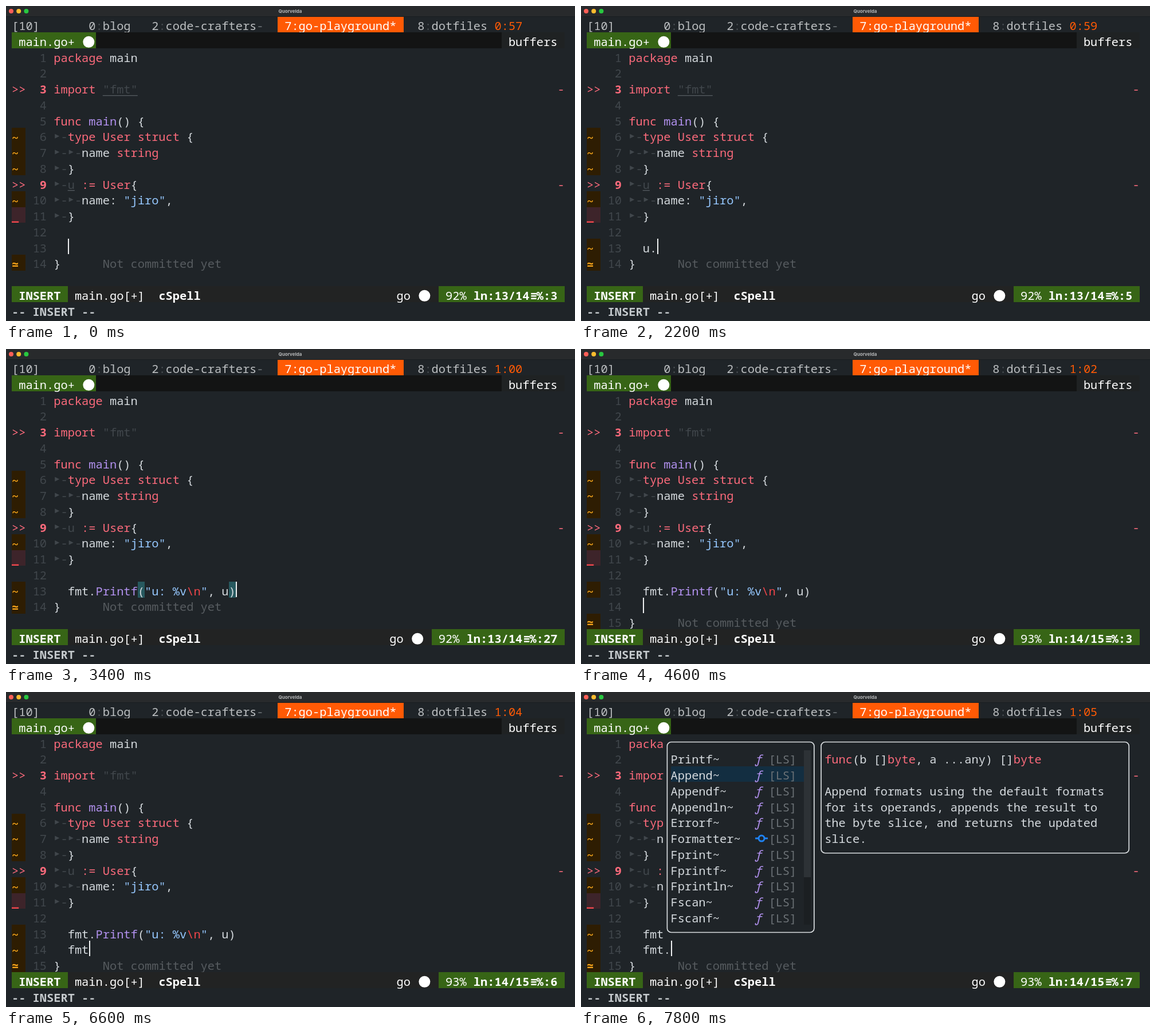
Write an HTML page with a canvas that moves like this. It is 993 px wide and 551 px high and loops after 8 s.

```html
<!DOCTYPE html>
<html lang="en">
<head>
<meta charset="utf-8">
<title>Terminal editor</title>
<style>
html, body { margin: 0; width: 100%; height: 100%; overflow: hidden; background: #1f2428; }
canvas { display: block; width: 993px; height: 551px; }
</style>
</head>
<body>
<canvas id="screen"></canvas>
<script>
const W = 993, H = 551, LOOP = 8000, STEP = 200;
const CW = 12.21, RH = 27.75, LEFT = 10, TOP = 18.6;
const FONT = '20.35px "Noto Sans Mono", "DejaVu Sans Mono", monospace';
const C = {
  bg: '#1f2428', fg: '#d5dade', red: '#fb6a7b', purple: '#b392f0', blue: '#96c8ff',
  dim: '#41474c', faint: '#4a4f53', note: '#575c60', white: '#ffffff', green: '#376516',
  orange: '#ff5a05', amber: '#f8a51b', signBg: '#2e1d02', cyan: '#2ba0bd', tag: '#6c7276',
  tab: '#bcbfc1', bar: '#222323', select: '#132e41', thumb: '#2d3236', track: '#1b1f22'
};

const canvas = document.getElementById('screen');
const ctx = canvas.getContext('2d');
const dpr = window.devicePixelRatio || 1;
canvas.width = W * dpr;
canvas.height = H * dpr;

const X = col => LEFT + col * CW;
const Y = row => TOP + row * RH;

function box(col, row, cols, rows, color) {
  const x = Math.round(X(col)), y = Math.round(Y(row));
  ctx.fillStyle = color;
  ctx.fillRect(x, y, Math.round(X(col + cols)) - x, Math.round(Y(row + rows)) - y);
}

function text(col, row, str, color = C.fg, style = '') {
  ctx.font = style + ' ' + FONT;
  ctx.fillStyle = color;
  ctx.fillText(str, X(col), Y(row) + 23.4);
}

// Draws [string, color] runs one after another.
function runs(col, row, ...parts) {
  for (const [str, color, style] of parts) {
    text(col, row, str, color, style);
    col += str.length;
  }
}

function dot(x, y, r, color) {
  ctx.fillStyle = color;
  ctx.beginPath();
  ctx.arc(x, y, r, 0, Math.PI * 2);
  ctx.fill();
}

function underline(col, row, cols) {
  ctx.fillStyle = '#555b60';
  ctx.fillRect(X(col), Math.round(Y(row) + 26), cols * CW, 1.3);
}

function tabMark(col, row) {
  const x = X(col) + 2, y = Y(row) + 14.8;
  ctx.fillStyle = C.dim;
  ctx.beginPath();
  ctx.moveTo(x, y - 4);
  ctx.lineTo(x + 8, y);
  ctx.lineTo(x, y + 4);
  ctx.fill();
  text(col + 1, row, '-', C.dim);
}

function sign(row, mark) {
  box(0, row, 2, 1, C.signBg);
  text(0, row + .05, mark, C.amber, 'bold');
}

function frameBox(col, row, cols, rows) {
  box(col, row, cols, rows, C.bg);
  ctx.strokeStyle = '#d9dde0';
  ctx.lineWidth = 1.7;
  ctx.beginPath();
  ctx.roundRect(X(col + .5), Y(row + .5) - .5, (cols - 1) * CW, (rows - 1) * RH, 7);
  ctx.stroke();
}

function moduleIcon(col, row) {
  const x = X(col) + 3.5, y = Y(row) + 7.5;
  ctx.strokeStyle = C.red;
  ctx.lineWidth = 1.8;
  ctx.beginPath();
  ctx.moveTo(x, y);
  ctx.lineTo(x + 12, y);
  ctx.lineTo(x + 17, y + 5);
  ctx.lineTo(x + 17, y + 19);
  ctx.lineTo(x, y + 19);
  ctx.closePath();
  for (const s of [-1, 1]) {
    ctx.moveTo(x + 8.5 + s * 2, y + 8);
    ctx.lineTo(x + 8.5 + s * 5, y + 11.5);
    ctx.lineTo(x + 8.5 + s * 2, y + 15);
  }
  ctx.stroke();
}

function interfaceIcon(col, row) {
  const x = X(col), y = Y(row) + 15.5;
  ctx.strokeStyle = '#1f83f5';
  ctx.lineWidth = 3;
  ctx.beginPath();
  ctx.moveTo(x + 1, y);
  ctx.lineTo(x + 6, y);
  ctx.moveTo(x + 18, y);
  ctx.lineTo(x + 23, y);
  ctx.moveTo(x + 17, y);
  ctx.arc(x + 12, y, 5, 0, Math.PI * 2);
  ctx.stroke();
}

const icons = {
  m: moduleIcon,
  i: interfaceIcon,
  f: (col, row) => text(col, row, 'ƒ', C.purple, 'italic')
};

// Each item is "label kind tag"; letters of the query are lit in order.
function menu(col, cols, kindCol, items, query, selected, thumbRows) {
  frameBox(col, 2, cols, 13);
  const end = col + cols - 2;
  box(col + 1, 3 + selected, cols - 3, 1, C.select);
  box(end, 3, 1, 11, C.track);
  box(end, 3, 1, thumbRows, C.thumb);
  items.forEach((item, i) => {
    const [label, kind, tag] = item.split(' ');
    const row = 3 + i;
    let hit = 0;
    runs(col + 1, row, ...[...label].map(ch => {
      const lit = hit < query.length && ch === query[hit];
      if (lit) hit++;
      return [ch, lit ? C.cyan : C.fg];
    }));
    if (icons[kind]) icons[kind](kindCol, row);
    text(kindCol + 2, row, tag, C.tag);
  });
}

const wordItems = ['fmt~ m [LS]', 'fmtcmd~ m [LS]', 'fmtsort~ m [LS]', 'fmtsort~ m [LS]',
  'fmt.Append~ f [LS]', 'fmt.Appendf~ f [LS]', 'fmt.Appendln~ f [LS]',
  'format - [10K]', 'formats - [10K]', 'formation - [10K]', 'formatting - [10K]'];
const memberItems = ['Printf', 'Append', 'Appendf', 'Appendln', 'Errorf', 'Formatter',
  'Fprint', 'Fprintf', 'Fprintln', 'Fscan', 'Fscanf']
  .map(name => `${name}~ ${name === 'Formatter' ? 'i' : 'f'} [LS]`);

function wordMenu() {
  menu(7, 25, 22, wordItems, 'fmt', 0, 9);
  frameBox(32, 2, 7, 3);
  text(33, 3, '"fmt"', C.blue);
}

function memberMenu(selected) {
  menu(11, 22, 24, memberItems, '', selected, 8);
  if (selected !== 1) return;
  frameBox(33, 2, 45, 8);
  runs(34, 3, ['func', C.red], ['(b []'], ['byte', C.red], [', a ...any) []'], ['byte', C.red]);
  ['Append formats using the default formats', 'for its operands, appends the result to',
    'the byte slice, and returns the updated', 'slice.']
    .forEach((line, i) => text(34, 5 + i, line));
}

const CALL = 'fmt.Printf("u: %v\\n", u)';
const typing = [
  [0, ''], [1400, 'u'], [1800, 'u.'], [2800, CALL], [4200, CALL, ''],
  [5000, CALL, 'f'], [5200, CALL, 'fm'], [5400, CALL, 'fmt'], [7000, CALL, 'fmt.']
];

function typedAt(t) {
  const [, first, second] = typing.filter(k => k[0] <= t).pop();
  return { first, second, split: second !== undefined };
}

function titleBar() {
  ctx.fillStyle = '#282a2c';
  ctx.fillRect(0, 0, W, 18);
  ctx.fillStyle = '#191d20';
  ctx.fillRect(0, 18, W, 1);
  ['#ff5f57', '#febc2e', '#28c840'].forEach((c, i) => dot(9 + i * 13.2, 9, 4, c));
  ctx.font = 'bold 8px Inter, sans-serif';
  ctx.fillStyle = '#b5b7b8';
  ctx.textAlign = 'center';
  ctx.fillText('Quorvelda', 496, 12);
  ctx.textAlign = 'left';
}

function tabs(t) {
  text(0, 0, '[10]', C.tab);
  runs(11, 0, ['0', C.tab], [':', C.faint], ['blog', C.tab]);
  runs(20, 0, ['2', C.tab], [':', C.faint], ['code-crafters', C.tab], ['-', C.tag]);
  box(38, 0, 18, 1, C.orange);
  text(39, 0, '7:go-playground*', C.white);
  runs(58, 0, ['8', C.tab], [':', C.faint], ['dotfiles', C.tab]);
  const sec = 57 + Math.floor((t + 400) / 1000);
  text(69, 0, Math.floor(sec / 60) + ':' + String(sec % 60).padStart(2, '0'), C.orange);

  box(0, 1, 12, 1, C.green);
  box(12, 1, 58, 1, '#131414');
  box(70, 1, 9, 1, '#1f2223');
  text(1, 1, 'main.go+', C.white);
  dot(X(11), Y(1) + 16.5, 10, C.white);
  text(71, 1, 'buffers', C.white);
}

function gutter(state) {
  const count = state.split ? 15 : 14;
  for (let n = 1; n <= count; n++) {
    const row = n + 1, error = n === 3 || n === 9;
    text(n < 10 ? 4 : 3, row, String(n), error ? C.red : C.dim, error ? 'bold' : '');
    if (error) {
      text(0, row, '>>', C.red);
      text(78, row, '-', C.red);
    }
  }
  [6, 7, 8, 10].forEach(n => sign(n + 1, '~'));
  box(0, 12, 2, 1, '#3d242a');
  text(0, 12, '_', '#f3484e', 'bold');
  if (state.first) sign(14, '~');
  if (state.second) sign(15, '~');
  sign(count + 1, '≃');
}

function code(state) {
  const unused = state.first !== CALL;
  runs(6, 2, ['package', C.red], [' main']);
  runs(6, 4, ['import ', C.red], ['"fmt"', C.dim]);
  runs(6, 6, ['func ', C.red], ['main', C.purple], ['() {']);
  [7, 8, 9, 10, 11, 12].forEach(row => tabMark(6, row));
  [8, 11].forEach(row => tabMark(8, row));
  runs(8, 7, ['type User struct', C.red], [' {']);
  runs(10, 8, ['name '], ['string', C.red]);
  text(8, 9, '}');
  runs(8, 10, ['u ', C.dim], [':= User', C.red], ['{']);
  runs(10, 11, ['name: '], ['"jiro"', C.blue], [',']);
  text(8, 12, '}');
  if (unused) {
    underline(13, 4, 5);
    underline(8, 10, 1);
    text(8, 14, state.first);
  } else {
    if (!state.split) [18, 31].forEach(col => box(col, 14, 1, 1, '#27595f'));
    runs(8, 14, ['fmt.'], ['Printf', C.purple], ['('], ['"u: %v', C.blue],
      ['\\n', '#f04549'], ['"', C.blue], [', u)']);
  }
  if (state.split) text(8, 15, state.second);
  const last = state.split ? 16 : 15;
  text(6, last, '}');
  text(13, last, 'Not committed yet', C.note);
}

function cursor(state) {
  const line = state.split ? state.second : state.first;
  ctx.fillStyle = '#eef0f1';
  ctx.fillRect(Math.ceil(X(8 + line.length)), Math.round(Y(state.split ? 15 : 14)), 2, 27);
}

function statusLine(state) {
  const line = state.split ? state.second : state.first;
  const pos = ':' + (line.length + 3);
  const start = 63 - pos.length;
  box(8, 17, 71, 1, C.bar);
  box(0, 17, 8, 1, C.green);
  box(start, 17, 79 - start, 1, C.green);
  text(1, 17, 'INSERT', C.white, 'bold');
  text(9, 17, 'main.go[+]', C.white);
  text(21, 17, 'cSpell', C.white, 'bold');
  text(start - 6, 17, 'go', C.white);
  dot(X(start - 2), Y(17) + 16.5, 10, C.white);
  text(start + 1, 17, state.split ? '93%' : '92%', C.white);
  text(start + 5, 17, state.split ? 'ln:14/15' : 'ln:13/14', C.white, 'bold');
  text(start + 13.1, 17, '≡', C.white, 'bold');
  text(start + 14, 17, '%' + pos, C.white, 'bold');
  text(0, 18, '-- INSERT --', '#c5cacd', 'bold');
}

function draw(t) {
  const state = typedAt(t);
  ctx.setTransform(dpr, 0, 0, dpr, 0, 0);
  ctx.fillStyle = C.bg;
  ctx.fillRect(0, 0, W, H);
  titleBar();
  tabs(t);
  gutter(state);
  code(state);
  if (t >= 5400 && t < 6400) wordMenu();
  if (t >= 7200) memberMenu(t < 7600 ? 0 : 1);
  cursor(state);
  statusLine(state);
}

const begin = performance.now();
function tick() {
  const t = (performance.now() - begin) % LOOP;
  draw(Math.floor(t / STEP) * STEP);
  requestAnimationFrame(tick);
}
tick();
</script>
</body>
</html>
```
